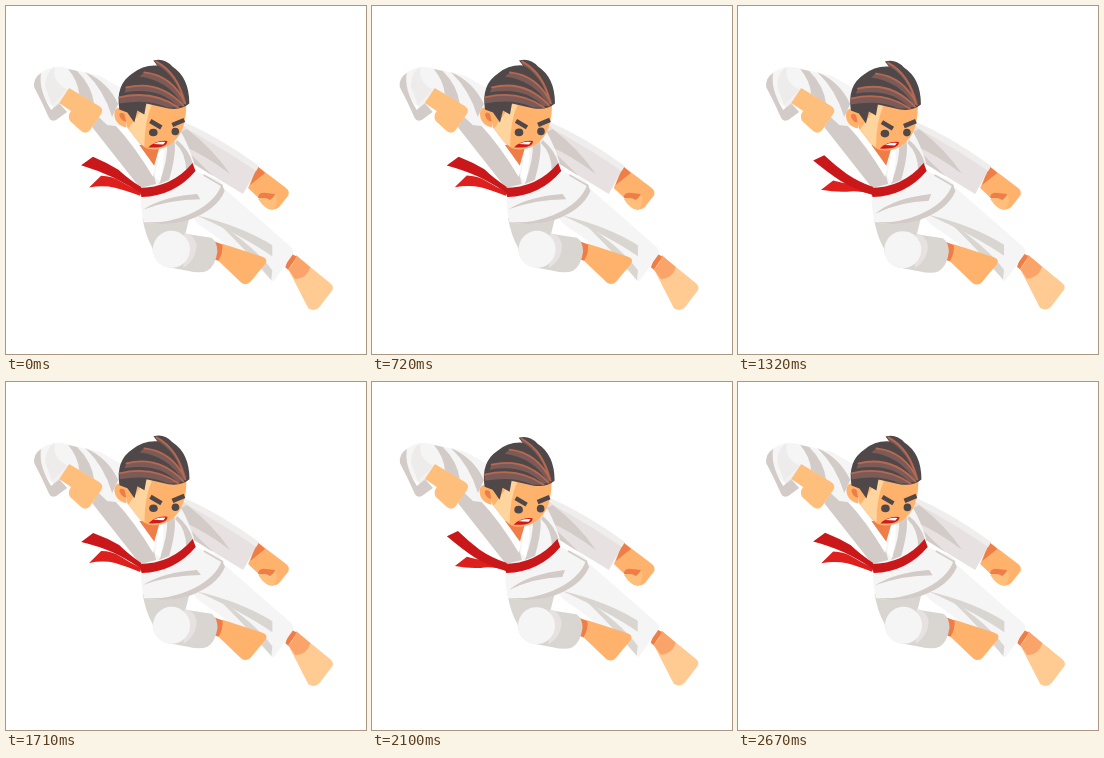
An HTML page for the animation above (2700 ms loop, 360 by 348 pixels).

```html
<!DOCTYPE html>
<html lang="en">
<head>
<meta charset="utf-8">
<style>
html, body { margin: 0; width: 100%; height: 100%; overflow: hidden; background: #fff; }
svg { display: block; width: 100vw; height: 100vh; }
.cloth { fill: #f5f5f5; }
.shade { fill: #d9d6d2; }
.warm { fill: #d3cbc7; }
.pale { fill: #e7e2e1; }
.light { fill: #ffcb92; }
.skin { fill: #ffbf7c; }
.tan { fill: #ffb26c; }
.rust { fill: #ef7d48; }
.hair { fill: #4f4748; }
.gloss { fill: #7a5b57; }
.streak { fill: none; stroke: #b96850; stroke-width: 1.8; stroke-linecap: round; }
.red { fill: #c9171a; }
.bright { fill: #dd201d; }
</style>
</head>
<body>
<svg viewBox="0 0 360 348">
  <g id="body">
    <g id="frontLeg">
      <path class="rust" d="M284 247L292 251L286 267L279 261Z"/>
      <path class="light" d="M291 250L324 277Q328 280 326 284L313 301Q308 306 302 302L282 263Z"/>
      <path d="M290 249L304 261Q301 272 289 273L282 263Q289 257 290 249Z" fill="#fba469"/>
      <path class="cloth" d="M213 178L285 241Q289 245 286 249L268 274Q265 277 264 272L260 268L204 226Q193 220 186 211Z"/>
      <path class="shade" d="M190 209Q236 220 266 239L266 250Q237 230 190 209Z"/>
      <path class="shade" d="M211 216Q249 241 266 264L265 274L259 267Q242 246 211 216Z"/>
    </g>
    <g id="backLeg">
      <path class="rust" d="M206 235L217 239L215 256L206 253Z"/>
      <path class="tan" d="M216 238L256 251Q262 253 259 258L244 276Q240 280 235 277L212 255Q217 247 216 238Z"/>
      <path class="shade" d="M136 212Q160 219 183 212L179 228L205 232Q211 236 211 246Q209 260 201 265Q194 268 181 265L165 262Q148 260 146 242Q139 230 136 212Z"/>
      <path class="pale" d="M178 227Q188 229 190 239Q190 254 177 262Z"/>
      <circle class="cloth" cx="165" cy="243.500" r="18.500"/>
    </g>
    <g id="hips">
      <path class="cloth" d="M134 187Q167 187 191 166L212 174Q218 179 217 185Q205 207 180 214Q157 221 137 216Q134 203 134 187Z"/>
      <path class="warm" d="M215 178Q209 197 181 209Q159 218 137 216Q159 221 182 214Q210 204 218 185Z"/>
      <path id="fold" class="warm"/>
      <path d="M197 169L216 180" fill="none" stroke="#d3cbc7" stroke-width="1.500"/>
    </g>

    <g id="rightArm">
      <path class="tan" d="M251 160L280 182Q285 186 281 191L273 201Q269 205 263 202L242 182Z"/>
      <path class="rust" d="M251 160L259 167L244 179Z"/>
      <path class="rust" d="M252 192Q252 186 260 187L269 188L265 195L260 192Z"/>
      <path class="skin" d="M252 193Q259 191 264 194L270 189Q272 197 267 204Q260 205 252 193Z"/>
      <path class="pale" d="M171 116L252 161L237 188L181 154Z"/>
      <path d="M176 115Q213 131 253 160L250 165Q218 143 181 123Z" fill="#f0eded"/>
      <path class="warm" d="M166 130L181 123Q207 143 224 168Q199 149 175 139L207 170L188 158Z"/>
    </g>

    <path class="cloth" d="M91 82L119 81L134 137L149 160L154 139L175 126Q183 140 188 157Q167 181 134 182L88 122Z"/>
    <path class="warm" d="M97 104Q123 130 147 166L150 178L134 182L86 121Z"/>
    <path class="warm" d="M168 133Q171 146 163 174L153 178Q162 153 161 138Z"/>
    <path class="warm" d="M171 134Q183 144 187 158L180 165Q180 147 169 137Z"/>
    <path class="rust" d="M131 139L154 139L148 160Z"/>
    <path d="M111 108L149 161L147 171Q128 139 108 118Z" fill="#fff"/>
    <path d="M153 143L149 171L154 176Q159 152 157 140Z" fill="#fff"/>

    <path class="cloth" d="M32 69Q44 58 60 62L94 70L118 84L117 121L101 119L82 101L62 83L45 100L35 89Z"/>
    <path class="warm" d="M62 63L71 65Q86 80 88 98L73 88Q72 75 62 63Z"/>
    <path class="warm" d="M79 66Q102 76 112 98L106 111Q98 84 79 66Z"/>
    <path class="warm" d="M35 67Q27 72 28 81Q36 96 43 112Q45 116 50 114L61 106L53 97L45 104Q32 83 35 67Z"/>
    <path class="pale" d="M49 61Q40 65 39 80L47 102L54 98L62 84Q45 76 49 61Z" opacity=".5"/>
    <path class="skin" d="M63 82L93 100Q98 103 95 108L84 124Q80 129 75 125L64 115Q61 110 65 105L53 97Z"/>

    <g id="head">
      <path class="tan" d="M120 104Q109 99 108 108Q108 119 120 122Z"/>
      <path class="rust" d="M119 109Q113 105 113 110Q115 116 120 116Z"/>
      <path class="tan" d="M117 103L138 97L180 99Q180 117 174 128Q164 144 147 144Q138 144 132 136L121 122Z"/>
      <path d="M139 99L146 98Q138 116 138 141L132 136L122 123L132 109Z" fill="#ffd49d"/>
      <path class="hair" d="M113 104Q109 79 126 68Q137 59 151 60L147 55Q158 52 166 61Q183 72 183 98Q175 105 162 103L140 98L138 109L131 105L128 117L121 107Z"/>
      <path class="gloss" d="M113 92Q146 84 172 102L161 102Q142 93 113 98Z"/>
      <path class="gloss" d="M120 82Q153 74 177 100L171 101Q153 81 118 87Z"/>
      <path class="gloss" d="M138 67Q166 70 179 98L176 99Q162 75 133 71Z"/>
      <path class="gloss" d="M150 56Q170 66 180 96L177 97Q170 70 150 59Z"/>
      <path class="streak" d="M113 92Q146 84 172 102M120 82Q153 74 177 100M138 67Q166 70 179 98M150 56Q172 68 178 97"/>
      <ellipse class="hair" cx="147" cy="127" rx="4.300" ry="3.800"/>
      <ellipse class="hair" cx="169" cy="126" rx="3.800" ry="3.800"/>
      <path d="M144 115.500L155 122M166 119.500L178 114.500" fill="none" stroke="#4f4748" stroke-width="4.500"/>
      <path d="M142 142Q150 134 161 135.500Q161 143 142 142Z" fill="#d3171a"/>
      <path d="M147 138.500Q153 135.500 159 136.500L157 139Z" fill="#fff"/>
    </g>

    <path id="lowTail" class="bright"/>
    <path id="highTail" class="red"/>
    <path id="belt" class="red" d="M132 182Q165 182 186 157L189 165Q168 190 135 191Z"/>
  </g>
</svg>
<script>
const PERIOD = 900, STEP = 30;
const $ = id => document.getElementById(id);
const wave = (t, period, peak) => Math.cos(2 * Math.PI * (t - peak) / period);
const shift = (id, x, y) => $(id).setAttribute('transform', `translate(${x} ${y})`);

// Each pair holds the two extreme poses of one flexible part.
const poses = {
  highTail: [
    'M75 154L86 149Q97 160 108 168Q120 176 135 181L134 189Q114 183 102 175Q90 167 75 154Z',
    'M75 160L87 151Q101 156 113 163Q122 172 135 181L134 186Q119 176 106 170Q92 164 75 160Z'
  ],
  lowTail: [
    'M83 184L95 175Q104 178 112 178Q122 179 135 183L134 188Q119 184 109 186Q97 187 83 184Z',
    'M83 181L95 169Q106 169 115 175Q124 181 135 186L134 190Q119 184 109 181Q97 178 83 181Z'
  ],
  fold: [
    'M138 208Q157 192 194 188L191 195Q162 196 138 208Z',
    'M136 203Q157 190 190 188L194 193Q163 193 136 203Z'
  ]
};

function mix([from, to], amount) {
  const ends = to.match(/\d+/g);
  let i = 0;
  return from.replace(/\d+/g, n => (+n + (ends[i++] - n) * amount).toFixed(2));
}

function draw(now) {
  const t = Math.floor(now / STEP) * STEP % PERIOD;
  const sway = wave(t, PERIOD, 345);
  for (const id in poses) $(id).setAttribute('d', mix(poses[id], (1 - sway) / 2));
  shift('body', 0.4 * wave(t, PERIOD / 2, 395) - 0.2, 0);
  shift('head', -0.3 * sway, 0.7 * sway);
  shift('hips', -0.8 * sway, 0);
  shift('belt', -0.6 * sway, 0);
  shift('backLeg', -0.4 * sway, 0.2 * sway);
  shift('frontLeg', -0.2 * sway, -0.2 * sway);
  requestAnimationFrame(draw);
}
requestAnimationFrame(draw);
</script>
</body>
</html>
```
